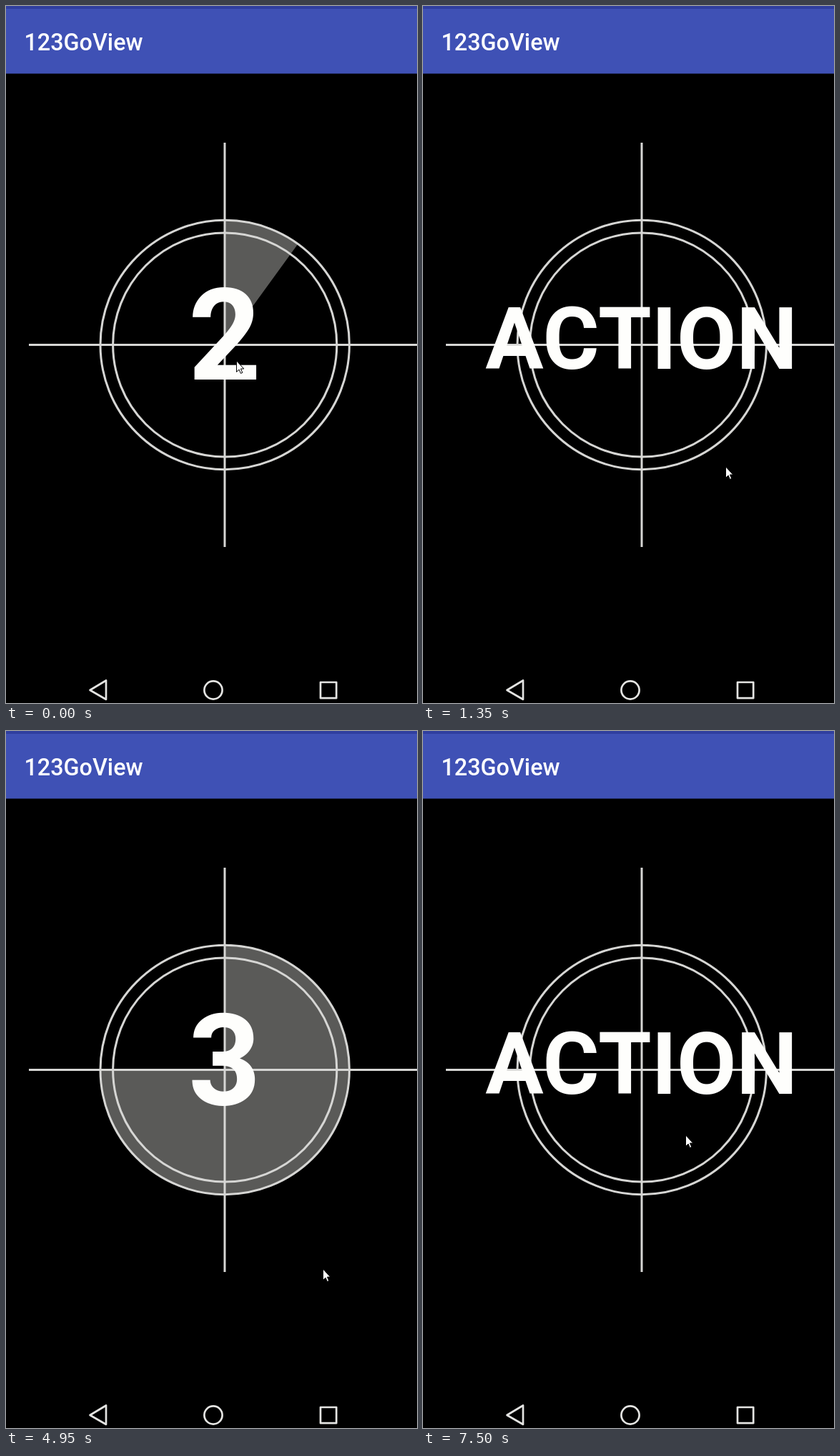
Write an HTML page that moves like this. It is 575 by 974 pixels and loops after 8000 ms.

```html
<!DOCTYPE html>
<html lang="en">
<head>
<meta charset="utf-8">
<title>Countdown</title>
<style>
html, body { margin: 0; width: 100%; height: 100%; overflow: hidden; background: #000; }
svg { display: block; width: 575px; height: 974px; }
text { font-family: Roboto, sans-serif; }
</style>
</head>
<body>
<svg viewBox="0 0 575 974">
  <rect width="575" height="974"/>
  <rect width="575" height="94.5" fill="#3f51b5"/>
  <rect width="575" height="4" fill="#303f9f"/>
  <text x="25.5" y="62" font-size="32.3" font-weight="500" fill="#fff">123GoView</text>
  <path id="sector" fill="#5a5a58"/>
  <g fill="none" stroke="#d6d6d4" stroke-width="3">
    <path d="M306 191V756M32 473.5H575"/>
    <circle cx="306.2" cy="473.5" r="174.2"/>
    <circle cx="306.2" cy="473.5" r="156.6"/>
  </g>
  <text id="label" text-anchor="middle" font-weight="700" fill="#fefefc"></text>
  <g fill="none" stroke="#e4e4e2" stroke-width="2.7" stroke-linejoin="round">
    <path d="M117.5 956L140 942.5V969Z"/>
    <circle cx="290" cy="956" r="12.6"/>
    <rect x="440" y="945" width="22.2" height="22.2"/>
  </g>
  <path id="cursor" d="M.5 .8V16.4L4.1 13L6.4 18.4L8.8 17.4L6.5 12H10.8Z" fill="#fff" stroke="#000"/>
</svg>
<script>
const LOOP = 8000, TICK = 137, LEAD = 45;
const CX = 306, CY = 473.5, R = 174, TURN = 360, END = 3 * TURN, STEP = 18;
const $ = id => document.getElementById(id);

// The screen refreshes in ticks; all times below count ticks.
// One countdown is three turns; the second run stalls once, then speeds up.
const runs = [
  { from: 0, to: 10, keys: [[0, 396], [10, 1172]] },
  { from: 28, to: 47, keys: [[28, 0], [30, 0], [33, 108], [36, 270], [37, 270], [38, 432], [47, END]] }
];

// Pointer moves: start, end, target x, y
const moves = [[9, 10, 423, 643], [13, 18, 339, 474], [28.5, 33, 443, 751], [50, 55, 367, 564]];

const mix = (a, b, p) => a + (b - a) * p;
const easeOut = p => 1 - (1 - p) ** 2;

function follow(keys, n) {
  const i = Math.max(1, keys.findIndex(key => key[0] >= n));
  const [a, u] = keys[i - 1], [b, v] = keys[i];
  return mix(u, v, (n - a) / (b - a));
}

function count(n) {
  const run = runs.find(r => n >= r.from && n < r.to);
  if (!run) return ['ACTION', 0];
  const swept = Math.min(END, STEP * Math.round(follow(run.keys, n) / STEP));
  const left = 3 - Math.floor(swept / TURN);
  return [left ? String(left) : 'ACTION', swept && (swept % TURN || TURN)];
}

function point(n) {
  let x = 322, y = 495;
  for (const [from, to, tx, ty] of moves) {
    const p = easeOut(Math.min(1, Math.max(0, (n - from) / (to - from))));
    x = mix(x, tx, p);
    y = mix(y, ty, p);
  }
  return [Math.round(x), Math.round(y)];
}

function wedge(deg) {
  if (!deg) return '';
  const a = Math.min(deg, 359.99) * Math.PI / 180;
  const x = CX + R * Math.sin(a), y = CY - R * Math.cos(a);
  return `M${CX} ${CY}V${CY - R}A${R} ${R} 0 ${deg > 180 ? 1 : 0} 1 ${x} ${y}Z`;
}

function draw(t) {
  const n = Math.floor((t + LEAD) / TICK);
  const [text, deg] = count(n);
  const word = text.length > 1;
  const label = $('label');
  $('sector').setAttribute('d', wedge(deg));
  label.textContent = text;
  label.setAttribute('font-size', word ? 120.9 : 177.5);
  label.setAttribute('x', word ? 305.6 : 306);
  label.setAttribute('y', word ? 507 : 522);
  $('cursor').setAttribute('transform', `translate(${point(n)})`);
}

let start;
function tick(now) {
  start ??= now;
  draw((now - start) % LOOP);
  requestAnimationFrame(tick);
}
draw(0);
requestAnimationFrame(tick);
</script>
</body>
</html>
```
